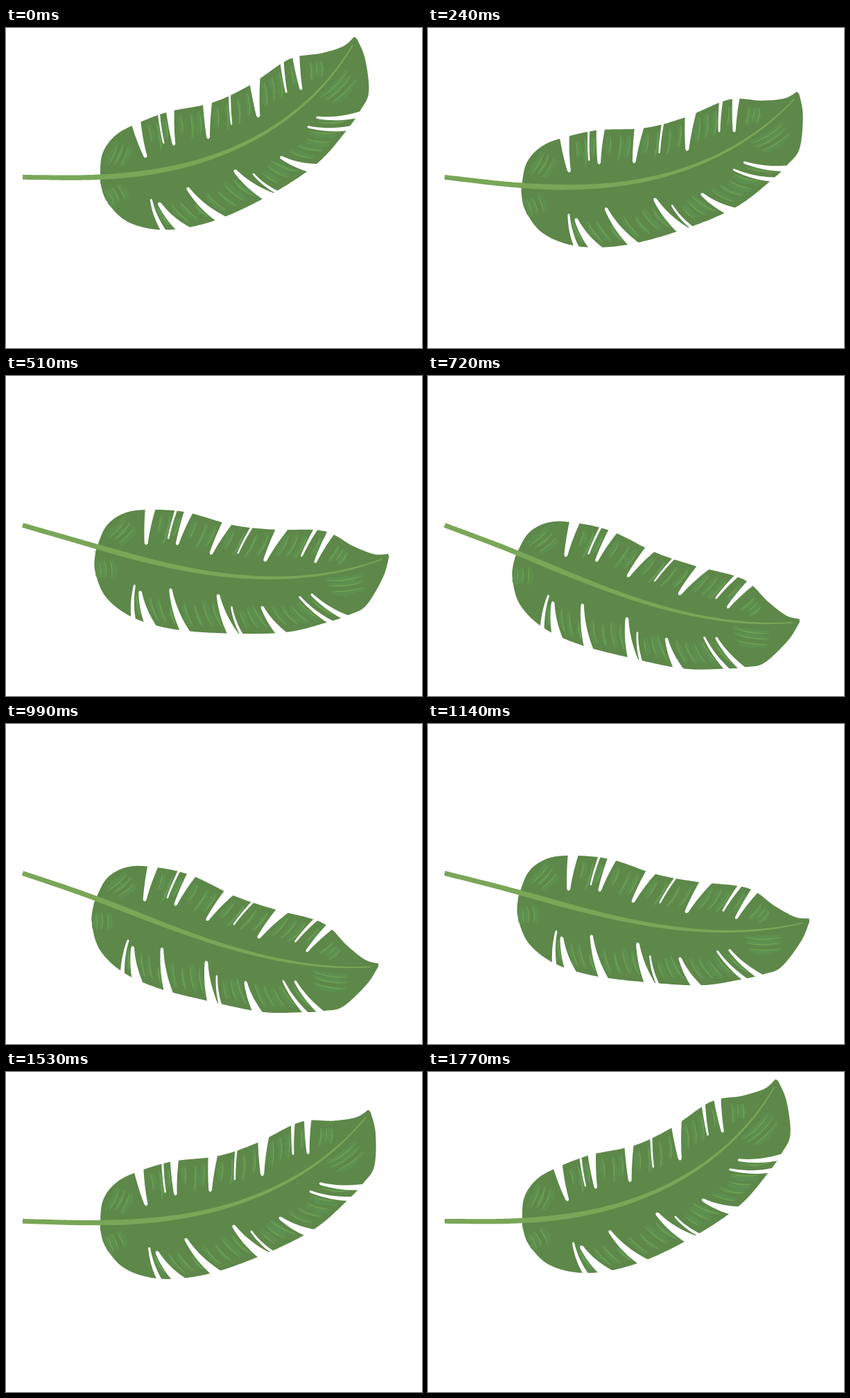
Write an HTML page with a canvas that moves like this. It is 600x462 px and loops after 1800 ms.

```html
<!DOCTYPE html>
<html lang="en">
<head>
<meta charset="utf-8">
<title>Swaying leaf</title>
<style>
  html, body { margin: 0; width: 100%; height: 100%; overflow: hidden; background: #fff; }
  canvas { display: block; }
</style>
</head>
<body>
<canvas id="stage" width="600" height="462"></canvas>
<script>
const ctx = document.getElementById('stage').getContext('2d');
const LOOP = 1800, STEP = 30;
const LENGTH = 539, N = 270, STEM = 0.2;
const RAD = Math.PI / 180;

// Midrib turned by `tilt` at the root, plus `curl` that grows towards the tip
function spine(tilt, curl) {
  const out = [], h = LENGTH / N;
  let x = 24, y = 215.4;
  for (let i = 0; i <= N; i++) {
    const u = i / N, blade = Math.max(0, (u - STEM) / (1 - STEM));
    const arch = 8.9 - 38 * blade ** 1.7;
    const bend = curl * (Math.max(0.1, u) - 0.15 * u ** 4);
    const a = (arch + tilt + bend) * RAD;
    const c = Math.cos(a), d = Math.sin(a);
    out.push({ x, y, c, d });
    const len = blade ? h * (1 - 0.0008 * curl) : h;
    x += c * len;
    y += d * len;
  }
  return out;
}

const rest = spine(0, 0);

// Attach a resting point to the nearest place on the midrib
function bind([x, y]) {
  let i = 0, best = Infinity;
  rest.forEach((p, k) => {
    const q = (p.x - x) ** 2 + (p.y - y) ** 2;
    if (q < best) { best = q; i = k; }
  });
  const p = rest[i], dx = x - p.x, dy = y - p.y;
  return { i, e: dx * p.c + dy * p.d, n: dy * p.c - dx * p.d };
}

// Smooth curve through key points
function smooth(keys) {
  const out = [], at = k => keys[Math.max(0, Math.min(keys.length - 1, k))];
  for (let k = 0; k < keys.length - 1; k++) {
    const [a, b, c, d] = [at(k - 1), at(k), at(k + 1), at(k + 2)];
    for (let t = 0; t < 1; t += 0.05) {
      out.push([0, 1].map(j => b[j] + 0.5 * t * (c[j] - a[j]
        + t * (2 * a[j] - 5 * b[j] + 4 * c[j] - d[j]
        + t * (3 * (b[j] - c[j]) + d[j] - a[j])))));
    }
  }
  out.push(at(keys.length));
  return out;
}

function quad([ax, ay], [cx, cy], [bx, by], n = 10) {
  return Array.from({ length: n + 1 }, (_, k) => {
    const t = k / n, u = 1 - t;
    return [u * u * ax + 2 * u * t * cx + t * t * bx,
            u * u * ay + 2 * u * t * cy + t * t * by];
  });
}

// Silhouette halves, both from the base to the tip
const upper = smooth([[133, 240], [143, 203], [165, 181], [197, 171], [255, 167],
  [325, 177], [385, 176], [455, 169], [500, 185], [532, 193], [552, 190]]);
const lower = smooth([[133, 240], [136, 268], [157, 304], [200, 328], [260, 337],
  [337, 333], [420, 321], [480, 298], [508, 284], [530, 268], [549, 225], [554, 194]]);
const outline = upper.concat([...lower].reverse()).map(bind);

// Upper slits: place and width; the lean and length follow from these
const upSlits = [[204, 14], [241, 3], [259, 12], [316, 13], [352, 3], [395, 15],
  [444, 5], [466, 10]].map(([x, w]) =>
  ({ x, w, lean: Math.min(21, (x - 204) * 0.23), len: 40 + 0.8 * w }));

// Lower slits: place, width, lean and length
const downSlits = [[200, 6, 6, 48], [225, 14, 25, 51], [276, 12, 27, 65],
  [345, 14, 29, 61], [357, 4, 28, 42], [413, 12, 44, 47], [482, 6, 59, 58],
  [502, 8, 64, 59]].map(([x, w, lean, len]) => ({ x, w, lean, len }));

// Edge point at x with the direction leading inwards and its left normal
function edge(x, lean, side) {
  const p = (side > 0 ? upper : lower).find(q => q[0] >= x);
  const s = Math.sin(lean * RAD), c = Math.cos(lean * RAD);
  return (along, across) => [
    x - s * along - c * across,
    p[1] + side * (c * along - s * across)
  ];
}

function slitShape({ x, w, lean, len }, side) {
  const at = edge(x, lean, side), out = -6;
  const mouth = w / 2 * (1 - out / len), end = 0.8 + w * 0.12;
  const bow = len * (side > 0 ? 0.04 : 0.1), inner = len - end;
  return [
    ...quad(at(out, -mouth), at(len * 0.45, bow - w / 4 - end / 2), at(inner, -end)),
    ...quad(at(inner, -end), at(len + end, 0), at(inner, end), 5),
    ...quad(at(inner, end), at(len * 0.45, bow + w / 4 + end / 2), at(out, mouth))
  ].map(bind);
}

const slits = [
  ...upSlits.map(s => slitShape(s, 1)),
  ...downSlits.map(s => slitShape(s, -1))
];

let seed = 7;
const rnd = () => (seed = (seed * 16807) % 2147483647) / 2147483647;

// Tapered, slightly bowed brush mark
function brush([x, y, dx, dy], width, rough, shift) {
  const len = Math.hypot(dx, dy), nx = -dy / len, ny = dx / len;
  const left = [], right = [], n = 12;
  for (let k = 0; k <= n; k++) {
    const t = k / n, arc = Math.sin(Math.PI * t);
    const mid = shift - arc * len * 0.05;
    const w = () => width * Math.sqrt(arc) * (1 - rough * rnd()) / 2;
    const at = off => [x + dx * t + nx * off, y + dy * t + ny * off];
    left.push(at(mid + w()));
    right.unshift(at(mid - w()));
  }
  return left.concat(right).map(bind);
}

// Strokes fill each lobe between two slits, following their lean
function lobeStrokes(list, side) {
  return list.slice(1).flatMap((b, k) => {
    const a = list[k], from = a.x + a.w / 2, gap = b.x - b.w / 2 - from;
    const n = Math.round(gap / 14);
    return Array.from({ length: n }, (_, j) => {
      const f = (j + 0.6) / n;
      const at = edge(from + gap * f, a.lean + (b.lean - a.lean) * f, side);
      const [x, y] = at(8, 0), [x1, y1] = at(34 + rnd() * 18, 0);
      return [x, y, x1 - x, y1 - y];
    });
  });
}

// Parallel strokes for the rounded ends of the leaf
function fan([x, y, dx, dy]) {
  const len = Math.hypot(dx, dy);
  return [-1, 0, 1].map(k => {
    const f = 0.7 + rnd() * 0.3, off = k * 8 / len;
    return [x - dy * off, y + dx * off, dx * f, dy * f];
  });
}

const strokes = [
  ...lobeStrokes(upSlits, 1), ...lobeStrokes(downSlits, -1),
  ...[[178, 192, -25, 34], [147, 250, 8, 34], [487, 190, -13, 26],
    [523, 234, -57, 14]].flatMap(fan)
];
const patches = strokes.map(s => brush(s, 11, 0.75, (rnd() - 0.5) * 8));
const marks = strokes.map(s => brush(s, 1.8, 0.2, 0));

// Stem and midrib as one tapering band
const band = [];
for (let i = 0; i <= N - 3; i += 2) {
  const u = i / N;
  const n = u < 0.3 ? 3.4 + u * 1.5 : 3.85 - 3.1 * (u - 0.3) / 0.7;
  band.push({ i, e: 0, n });
  band.unshift({ i, e: 0, n: -n });
}

function fill(shape, bone, color) {
  ctx.beginPath();
  for (const { i, e, n } of shape) {
    const p = bone[i];
    ctx.lineTo(p.x + e * p.c - n * p.d, p.y + e * p.d + n * p.c);
  }
  ctx.fillStyle = color;
  ctx.fill();
}

function draw(ms) {
  const a = ms / LOOP * 360;
  const tilt = 2.1 - 8 * Math.cos((a + 28) * RAD);
  const curl = -26.6 * (0.208 + Math.cos(a * RAD));
  const bone = spine(tilt, curl);

  ctx.fillStyle = '#fff';
  ctx.fillRect(0, 0, 600, 462);
  fill(outline, bone, '#5d8849');
  patches.forEach(s => fill(s, bone, '#5d9050'));
  marks.forEach(s => fill(s, bone, '#70a152'));
  slits.forEach(s => fill(s, bone, '#fff'));
  fill(band, bone, '#79a657');
}

const start = performance.now();
function tick() {
  const t = (performance.now() - start) % LOOP;
  draw(Math.floor(t / STEP) * STEP);
  requestAnimationFrame(tick);
}
tick();
</script>
</body>
</html>
```
